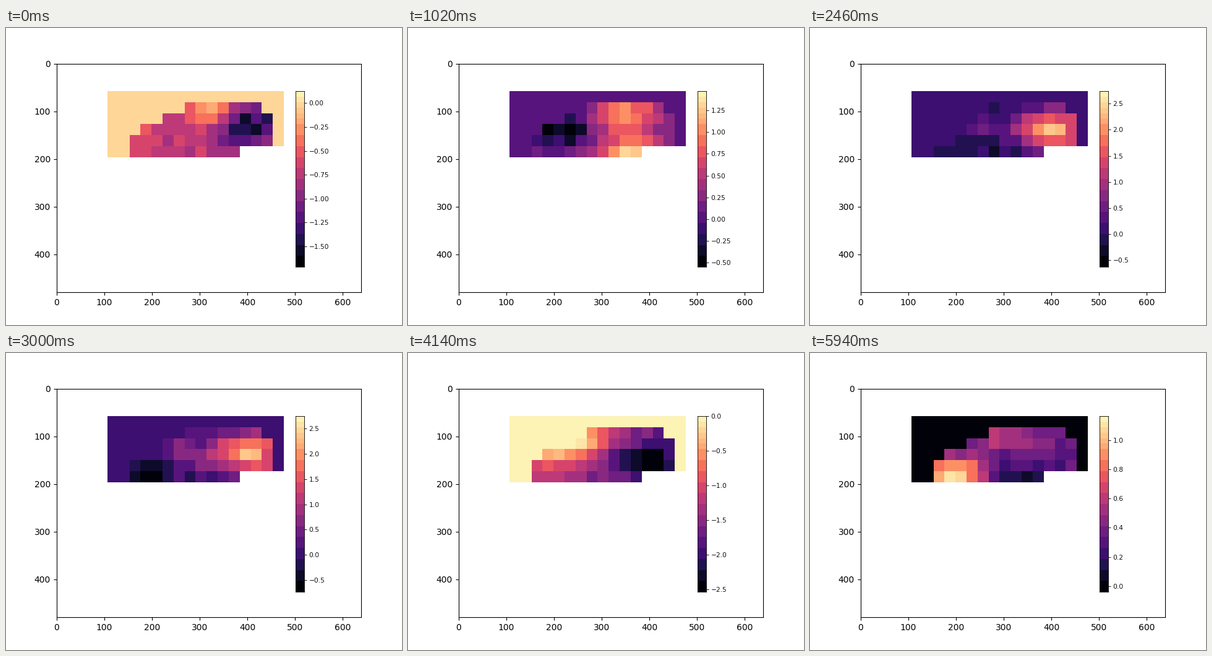
These frames come from a looping animation (640 by 480 pixels, 6 s). A matplotlib script:

```python
import numpy as np
import matplotlib
import matplotlib.pyplot as plt
from matplotlib.animation import FuncAnimation

W, H, DPI = 640, 480, 100
FRAMES, INTERVAL = 100, 60
SCALE = 0.77          # size of the inner chart relative to the stage
GRID = 16
ROUGHNESS = 0.04      # spread of the cell-to-cell variation

plt.rcParams["font.family"] = "DejaVu Sans"

# Active columns of each row; the other cells of the sheet stay at zero.
ACTIVE = {1: (7, 13), 2: (5, 14), 3: (3, 14), 4: (2, 14), 5: (2, 11)}

# Key poses: frame, low and high end of the scale, resting level of the
# active cells, and hills or hollows on it as (column, row, height).
POSES = [
    (0, -1.713, 0.126, 0.50, [(9, 1.3, 0.35), (12, 2.5, -0.45), (2, 4, 0.15)]),
    (17, -0.55, 1.472, 0.38, [(10, 1.5, 0.40), (4, 3, -0.40), (10.5, 5, 0.50)]),
    (32, -0.534, 2.736, 0.25, [(12, 3.2, 0.65), (8, 4.7, -0.25), (7.5, 1, -0.20)]),
    (50, -0.733, 2.75, 0.22, [(12.5, 2.8, 0.65), (3, 4.7, -0.18), (7.5, 3, 0.18)]),
    (69, -2.536, 0.0, 0.38, [(3, 3, 0.40), (6, 1.3, 0.55), (12, 3.5, -0.40)]),
    (83, -1.06, 1.33, 0.28, [(3.5, 4, -0.22), (9, 5, 0.60), (7, 1, -0.28), (11, 1, 0.30)]),
    (99, -0.04, 1.167, 0.28, [(3.5, 5, 0.70), (8.5, 5, -0.20), (7, 1, 0.20), (10, 2, 0.13)]),
]


def stepped_magma():
    """Magma in flat bands, narrower towards the bright end."""
    edges = np.r_[np.arange(0, 208, 16), np.arange(208, 257, 8)]
    widths = np.diff(edges)
    colours = matplotlib.colormaps["magma"](edges[:-1] + widths // 4)
    return np.repeat(colours, widths, axis=0)


def landscape(base, hills):
    """Level of every active cell: soft hills plus a little roughness."""
    rows, cols = CELLS.T
    level = base + rng.normal(0, ROUGHNESS, len(CELLS))
    for col, row, height in hills:
        level += height * np.exp(-((cols - col) / 2) ** 2 / 2
                                 - ((rows - row) / 1.2) ** 2 / 2)
    return level


rng = np.random.default_rng(4)
TABLE = stepped_magma()
CELLS = np.array([(r, c) for r, (a, b) in ACTIVE.items() for c in range(a, b + 1)])
KEYS, LOWS, HIGHS = zip(*(pose[:3] for pose in POSES))
LEVELS = [landscape(*pose[3:]) for pose in POSES]


def sheet(levels, zero):
    field = np.full((GRID, GRID), zero)
    field[CELLS[:, 0], CELLS[:, 1]] = levels
    rgba = TABLE[np.clip(field * 256, 0, 255).astype(int)]
    rgba[5, 12:, 3] = 0
    rgba[6:, :, 3] = 0
    return rgba


fig, ax = plt.subplots(figsize=(W / DPI, H / DPI), dpi=DPI)
heat = ax.imshow(np.ones((GRID, GRID, 4)), interpolation="nearest",
                 extent=(106.7, 476.3, 426.7, 57.1))
ax.set(xlim=(-0.5, W - 0.5), ylim=(H - 0.5, -0.5))

bar_ax = fig.add_axes([468 / W, 94 / H, 14 / W, 284 / H])
bar = bar_ax.imshow(TABLE[:, None], origin="lower", aspect="auto",
                    interpolation="nearest", extent=(0, 1, 0, 1))
bar_ax.set_xticks([])
bar_ax.yaxis.tick_right()
bar_ax.tick_params(axis="y", labelsize=10 * SCALE, length=3.5 * SCALE,
                   width=0.8 * SCALE, pad=3.5 * SCALE, labelcolor="#111111")
for spine in bar_ax.spines.values():
    spine.set_linewidth(0.8 * SCALE)


def draw(frame):
    pose = np.interp(frame, KEYS, range(len(KEYS)))
    i = min(int(pose), len(KEYS) - 2)
    t = pose - i
    low = np.interp(frame, KEYS, LOWS)
    high = np.interp(frame, KEYS, HIGHS)
    levels = (1 - t) * LEVELS[i] + t * LEVELS[i + 1]
    heat.set_data(sheet(levels, -low / (high - low)))
    bar.set_extent((0, 1, low, high))
    bar_ax.set_ylim(low, high)
    return heat, bar


anim = FuncAnimation(fig, draw, frames=FRAMES, interval=INTERVAL,
                     init_func=lambda: draw(0), repeat=True, repeat_delay=0)
plt.show()
```
